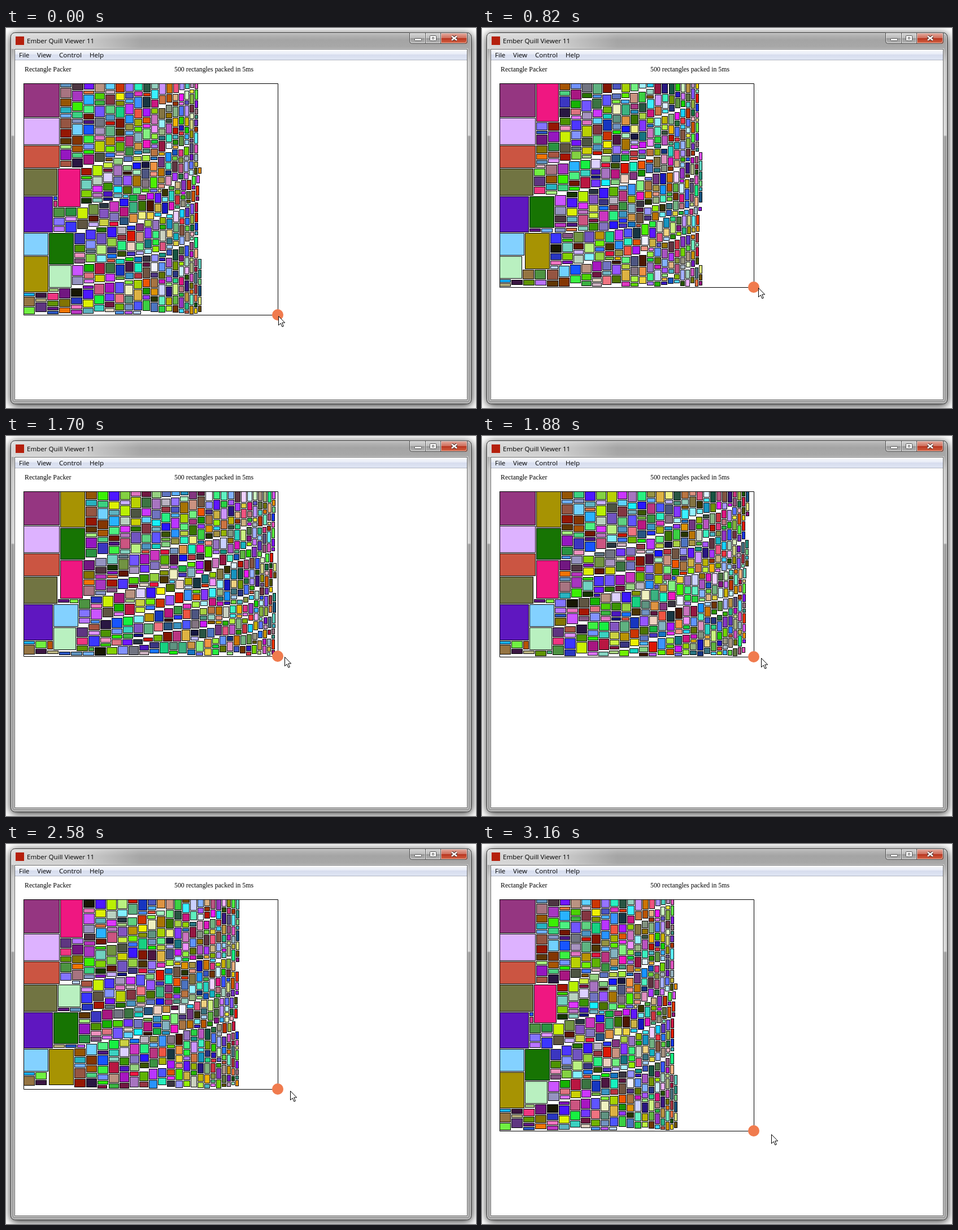
An HTML page with a canvas that plays this animation: 832x673 px, repeating every 3.41 s.

```html
<!DOCTYPE html>
<html lang="en">
<head>
<meta charset="utf-8">
<title>Rectangle Packer</title>
<style>
html, body { margin: 0; width: 100%; height: 100%; overflow: hidden; background: #fff; }
canvas, svg { position: absolute; left: 0; top: 0; width: 832px; height: 673px; display: block; }
.ui { font: 11.6px "Open Sans", "Noto Sans", sans-serif; }
.serif { font: 11.85px "Liberation Serif", "Times New Roman", serif; }
</style>
</head>
<body>
<canvas id="stage" width="832" height="673"></canvas>
<svg width="832" height="673" viewBox="0 0 832 673">
  <g class="ui">
    <text x="37" y="27">Ember Quill Viewer 11</text>
    <text x="23" y="52">File</text>
    <text x="55" y="52">View</text>
    <text x="94" y="52">Control</text>
    <text x="148" y="52">Help</text>
  </g>
  <g class="serif">
    <text x="33" y="77">Rectangle Packer</text>
    <text x="298" y="77">500 rectangles packed in 5ms</text>
  </g>
</svg>
<script>
const stage = document.getElementById('stage');
const ctx = stage.getContext('2d');
const LOOP = 3410, LEFT = 31, TOP = 98, BOX_W = 450, PAD = 1, COUNT = 500;

// Drag steps: start time, box height, cursor offset from the handle
const STEPS = [
  [0, 410, 1, 2], [40, 385, 5, 2], [820, 361, 8, 1], [1220, 330, 11, -1],
  [1700, 292, 12, 1], [1880, 293, 13, 2], [2020, 295, 14, 2],
  [2580, 336, 22, 3], [2940, 373, 27, 5], [3160, 410, 31, 6]
];

// The ten big boxes, widest first: id, width, height
const BIG = [
  [3, 64, 60], [7, 64, 48], [6, 64, 40], [1, 60, 48], [0, 52, 64],
  [2, 44, 40], [4, 44, 64], [9, 44, 56], [5, 40, 40], [8, 40, 68]
];

function makeSizes() {
  let seed = 20117;
  const rnd = () => (seed = (seed * 16807) % 2147483647) / 2147483647;
  const sizes = BIG.map(([id, w, h]) => ({ id, w, h }));
  const small = COUNT - BIG.length;
  const ids = Array.from({ length: small }, (_, k) => BIG.length + k);
  for (let k = 0; k < small; k++) {
    const [id] = ids.splice(Math.floor(rnd() * ids.length), 1);
    const w = 20 - Math.floor(15 * (k / small) ** 1.04);
    const h = 6 + Math.floor((k * 0.7548776662 % 1) * 15);
    sizes.push({ id, w, h });
  }
  return sizes;
}

const area = (x, y, r, b) => ({ x, y, r, b, w: r - x, h: b - y });

function swapOut(list, i) {
  const last = list.pop();
  if (i < list.length) list[i] = last;
}

function divide(cut, a, out) {
  const before = out.length;
  if (a.r > cut.r) out.push(area(cut.r, a.y, a.r, a.b));
  if (cut.x > a.x) out.push(area(a.x, a.y, cut.x, a.b));
  if (a.b > cut.b) out.push(area(a.x, cut.b, a.r, a.b));
  if (cut.y > a.y) out.push(area(a.x, a.y, a.r, cut.y));
  if (out.length === before && (cut.w < a.w || cut.h < a.h)) out.push(a);
}

function dropNested(list) {
  for (let i = list.length - 1; i >= 0; i--) {
    const f = list[i];
    const nested = list.some((a, j) =>
      i !== j && f.x >= a.x && f.y >= a.y && f.r <= a.r && f.b <= a.b);
    if (nested) swapOut(list, i);
  }
}

// Leftmost free area that holds the box
function findFree(free, w, h, packed) {
  let bestX = BOX_W + 1, index = -1;
  for (let i = free.length - 1; i >= 0; i--) {
    const f = free[i];
    const pad = f.x < packed.w || f.y < packed.h ? PAD : 0;
    const pw = w + pad, ph = h + pad;
    if (f.x >= bestX || pw > f.w || ph > f.h) continue;
    index = i;
    if ((pw === f.w && f.w <= f.h && f.r < BOX_W) || (ph === f.h && f.h <= f.w)) break;
    bestX = f.x;
  }
  return index;
}

function pack(sizes, height) {
  const free = [area(0, 0, BOX_W, height)], placed = [], packed = { w: 0, h: 0 };
  for (const { id, w, h } of sizes) {
    const index = findFree(free, w, h, packed);
    if (index < 0) continue;
    const { x, y } = free[index];
    const cut = area(x, y, x + w + PAD, y + h + PAD);
    const fresh = [];
    for (let i = free.length - 1; i >= 0; i--) {
      const a = free[i];
      if (x >= a.r || cut.r + 1 <= a.x || y >= a.b || cut.b + 1 <= a.y) continue;
      divide(cut, a, fresh);
      swapOut(free, i);
    }
    dropNested(fresh);
    while (fresh.length) free.push(fresh.pop());
    placed.push({ id, x, y, w, h });
    packed.w = Math.max(packed.w, x + w);
    packed.h = Math.max(packed.h, y + h);
  }
  return placed;
}

function colour(id) {
  const r = 23 + 18 * ((id + 4) % 13);
  const g = 23 + 31 * ((id * 3) % 8);
  const b = 3 + 63 * (((id + 1) * 3) % 5);
  return `rgb(${r},${g},${b})`;
}

function fill(style, x, y, w, h) {
  ctx.fillStyle = style;
  ctx.fillRect(x, y, w, h);
}

function gradient(x0, y0, x1, y1, ...stops) {
  const g = ctx.createLinearGradient(x0, y0, x1, y1);
  for (const [at, c] of stops) g.addColorStop(at, c);
  return g;
}

function round(x, y, w, h, radii) {
  ctx.beginPath();
  ctx.roundRect(x, y, w, h, radii);
}

function outline(style, x, y, w, h, radii = 0) {
  round(x + 0.5, y + 0.5, w - 1, h - 1, radii);
  ctx.strokeStyle = style;
  ctx.lineWidth = 1;
  ctx.stroke();
}

function drawButton(x, w, radii, stops) {
  round(x, 9, w, 19, radii);
  ctx.fillStyle = gradient(0, 9, 0, 28, ...stops);
  ctx.fill();
  outline('rgba(255,255,255,.55)', x + 1, 9, w - 2, 18, radii);
  outline('#4c4c4c', x, 8, w, 20, radii);
}

function drawCross() {
  for (const [style, width] of [['#5a3430', 5], ['#fff', 2.6]]) {
    ctx.strokeStyle = style;
    ctx.lineWidth = width;
    ctx.beginPath();
    ctx.moveTo(789, 14.5); ctx.lineTo(798, 21.5);
    ctx.moveTo(798, 14.5); ctx.lineTo(789, 21.5);
    ctx.stroke();
  }
}

function drawWindow() {
  fill('#fff', 0, 0, 832, 673);
  ctx.save();
  ctx.shadowColor = 'rgba(0,0,0,.92)';
  ctx.shadowBlur = 15;
  ctx.shadowOffsetY = 2;
  round(9, 9, 815, 657, 7);
  ctx.fillStyle = '#999';
  ctx.fill();
  ctx.restore();

  ctx.save();
  round(8, 8, 816, 658, 7);
  ctx.clip();
  fill(gradient(0, 8, 0, 666, [0, '#bdbdbd'], [0.02, '#a4a4a4'], [0.045, '#a9a9a9'],
    [0.08, '#c9c9c9'], [0.276, '#d6d6d6'], [0.28, '#9c9c9c'], [1, '#a2a2a2']), 8, 8, 816, 658);
  fill(gradient(9, 0, 240, 0, [0, 'rgba(255,255,255,.55)'], [0.55, 'rgba(255,255,255,.45)'],
    [1, 'rgba(255,255,255,0)']), 9, 9, 231, 28);
  ctx.restore();
  outline('rgba(255,255,255,.75)', 9, 9, 814, 656, 6);
  outline('#2e2e2e', 8, 8, 816, 658, 7);
  outline('rgba(255,255,255,.6)', 14, 36, 804, 624);
  outline('#5c5c5c', 15, 37, 802, 622);
  fill('#fff', 16, 38, 800, 620);
  fill(gradient(0, 38, 0, 57, [0, '#fbfcfe'], [0.45, '#e7ebf6'], [0.5, '#d7ddee'],
    [1, '#e0e6f4']), 16, 38, 800, 18);
  fill('#b6bccc', 16, 56, 800, 1);
  fill('#f0f0f0', 16, 57, 800, 1);

  fill('#b5200d', 17, 15, 15, 15);

  const grey = [[0, '#d4d4d4'], [0.45, '#bcbcbc'], [0.5, '#989898'], [1, '#b8b8b8']];
  const red = [[0, '#e3aa9e'], [0.45, '#d0705e'], [0.5, '#b83620'], [1, '#d8694a']];
  drawButton(714, 29, [0, 0, 0, 4], grey);
  drawButton(742, 28, 0, grey);
  drawButton(769, 48, [0, 0, 4, 0], red);
  fill('#fff', 724, 19, 11, 3);
  outline('#555', 723, 18, 13, 5, 1);
  fill('#fff', 751, 14, 10, 8);
  outline('#555', 750, 13, 12, 10, 1);
  outline('#555', 754, 16, 4, 4);
  drawCross();
}

const arrow = new Path2D('M0 0V16L3.7 12.5L6.4 18.6L8.8 17.6L6.2 11.5H11.2Z');

function drawCursor(x, y) {
  ctx.save();
  ctx.translate(x + 0.5, y + 0.5);
  ctx.fillStyle = '#fff';
  ctx.fill(arrow);
  ctx.strokeStyle = '#000';
  ctx.lineWidth = 1;
  ctx.stroke(arrow);
  ctx.restore();
}

function drawScene([, height, dx, dy], boxes) {
  const right = LEFT + BOX_W, bottom = TOP + height;
  ctx.drawImage(chrome, 0, 0);
  for (const { id, x, y, w, h } of boxes) {
    fill('#000', LEFT + x, TOP + y, w, h);
    fill(colour(id), LEFT + x + 1, TOP + y + 1, w - 2, h - 2);
  }
  outline('#000', LEFT, TOP, BOX_W + 1, height + 1);
  ctx.beginPath();
  ctx.arc(right, bottom, 10, 0, Math.PI * 2);
  ctx.fillStyle = '#f07b4e';
  ctx.fill();
  drawCursor(right + dx, bottom + dy);
}

drawWindow();
const chrome = document.createElement('canvas');
chrome.width = 832;
chrome.height = 673;
chrome.getContext('2d').drawImage(stage, 0, 0);

const sizes = makeSizes();
const layouts = STEPS.map(([, height]) => pack(sizes, height));
const start = performance.now();
let shown = -1;

function tick() {
  const t = Math.max(0, performance.now() - start) % LOOP;
  let i = STEPS.length - 1;
  while (STEPS[i][0] > t) i--;
  if (i !== shown) drawScene(STEPS[i], layouts[i]);
  shown = i;
  requestAnimationFrame(tick);
}
tick();
</script>
</body>
</html>
```
